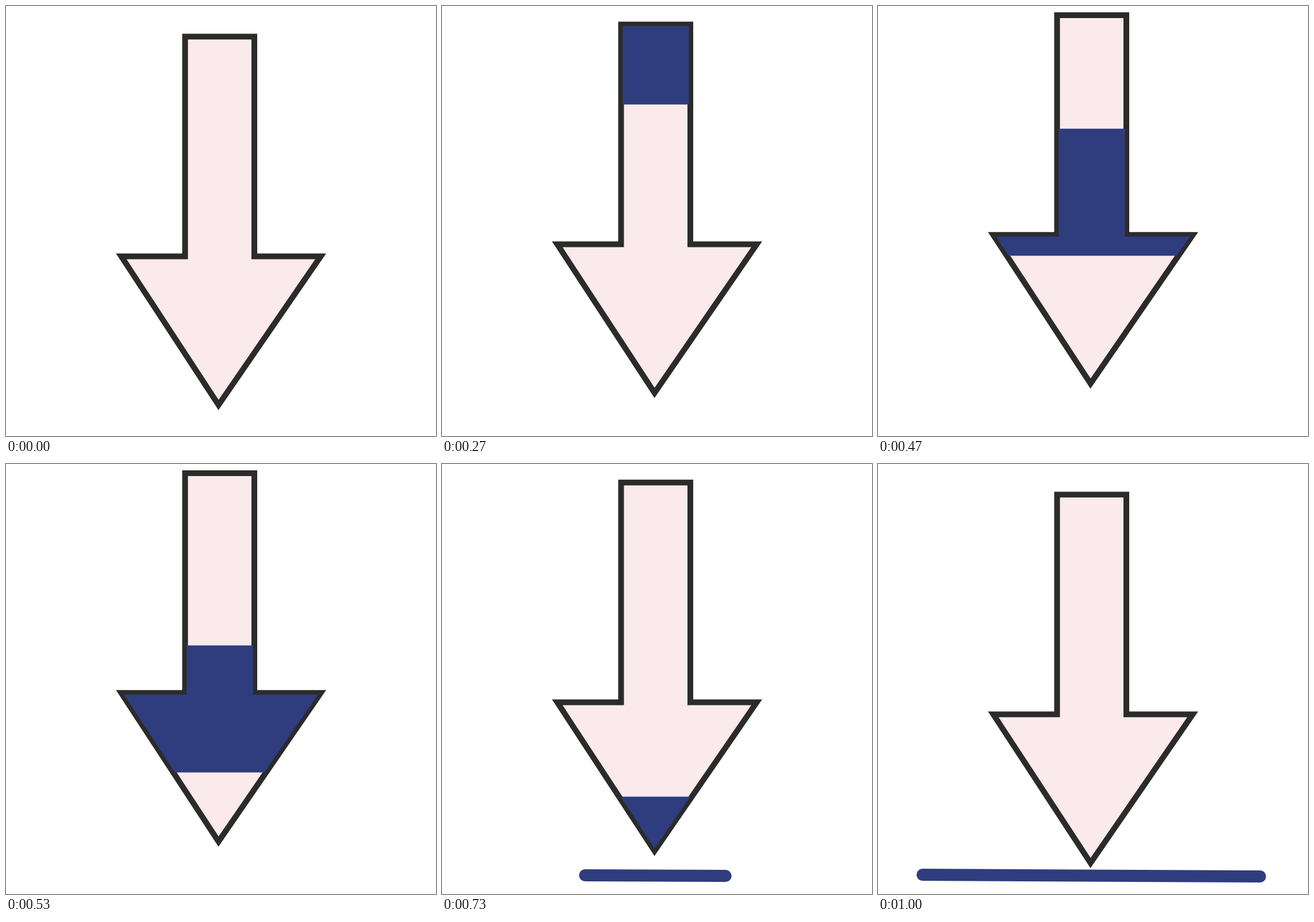
Animation of 748x748 px, one loop 1.06 s. Source, as an HTML page:

```html
<!DOCTYPE html>
<html lang="en">
<head>
<meta charset="utf-8">
<title>Download arrow</title>
<style>
  html, body { margin: 0; width: 100%; height: 100%; overflow: hidden; background: #fff; }
  svg { display: block; width: 100vw; height: 100vh; }
  .arrow { fill: #fbeaeb; stroke: #2b2b2a; stroke-width: 10; stroke-miterlimit: 6; }
  .band { fill: #2f3c7e; }
  .ground { stroke: #2f3c7e; stroke-width: 21; stroke-linecap: round; }
</style>
</head>
<body>
<svg viewBox="0 0 748 748">
  <clipPath id="inside">
    <path d="M314.2 55.7H429.5V438.2H542.7L369.7 689.6L205.2 438.2H314.2Z"/>
  </clipPath>
  <line class="ground" id="ground" visibility="hidden"/>
  <g id="bob">
    <path class="arrow" d="M311.5 53.2H432V435.4H547.5L369.7 694L200.5 435.4H311.5Z"/>
    <g clip-path="url(#inside)">
      <rect class="band" id="band" x="180" y="-181" width="390" height="221"/>
    </g>
  </g>
</svg>
<script>
  const LOOP = 1060, LAST = 30;
  const $ = id => document.getElementById(id);
  const [bob, band, ground] = ['bob', 'band', 'ground'].map($);

  const clamp = x => Math.min(1, Math.max(0, x));

  // Same curve as CSS ease-in-out: cubic-bezier(.42, 0, .58, 1)
  function ease(x) {
    let lo = 0, hi = 1;
    for (let i = 0; i < 24; i++) {
      const s = (lo + hi) / 2, r = 1 - s;
      if (1.26 * s * r * r + 1.74 * s * s * r + s ** 3 < x) lo = s; else hi = s;
    }
    return lo * lo * (3 - 2 * lo);
  }

  // Motion runs at 30 steps per second, with step times rounded to 10 ms
  function stepAt(ms) {
    const tick = Math.floor(ms / 10) * 10;
    return Math.min(LAST, Math.floor((tick + 5) * 0.03));
  }

  function drawGround(step) {
    const start = 17.85, length = 9.2;
    const half = 293.5 * ease(clamp((step - start) / length));
    const tilt = half * 0.0051;
    ground.setAttribute('visibility', step > start ? 'visible' : 'hidden');
    ground.setAttribute('x1', 371 - half);
    ground.setAttribute('x2', 371 + half);
    ground.setAttribute('y1', 716 - tilt);
    ground.setAttribute('y2', 716 + tilt);
  }

  function draw(step) {
    const lift = -37.5 * ease(1 - Math.abs(step / 15 - 1));
    bob.setAttribute('transform', `translate(0 ${lift})`);
    // The band falls in stage space, so the lift is taken back out
    band.setAttribute('y', -181 + 891 * ease(step / LAST) - lift);
    drawGround(step);
  }

  const begin = performance.now();
  function tick() {
    draw(stepAt((performance.now() - begin) % LOOP));
    requestAnimationFrame(tick);
  }
  tick();
</script>
</body>
</html>
```
